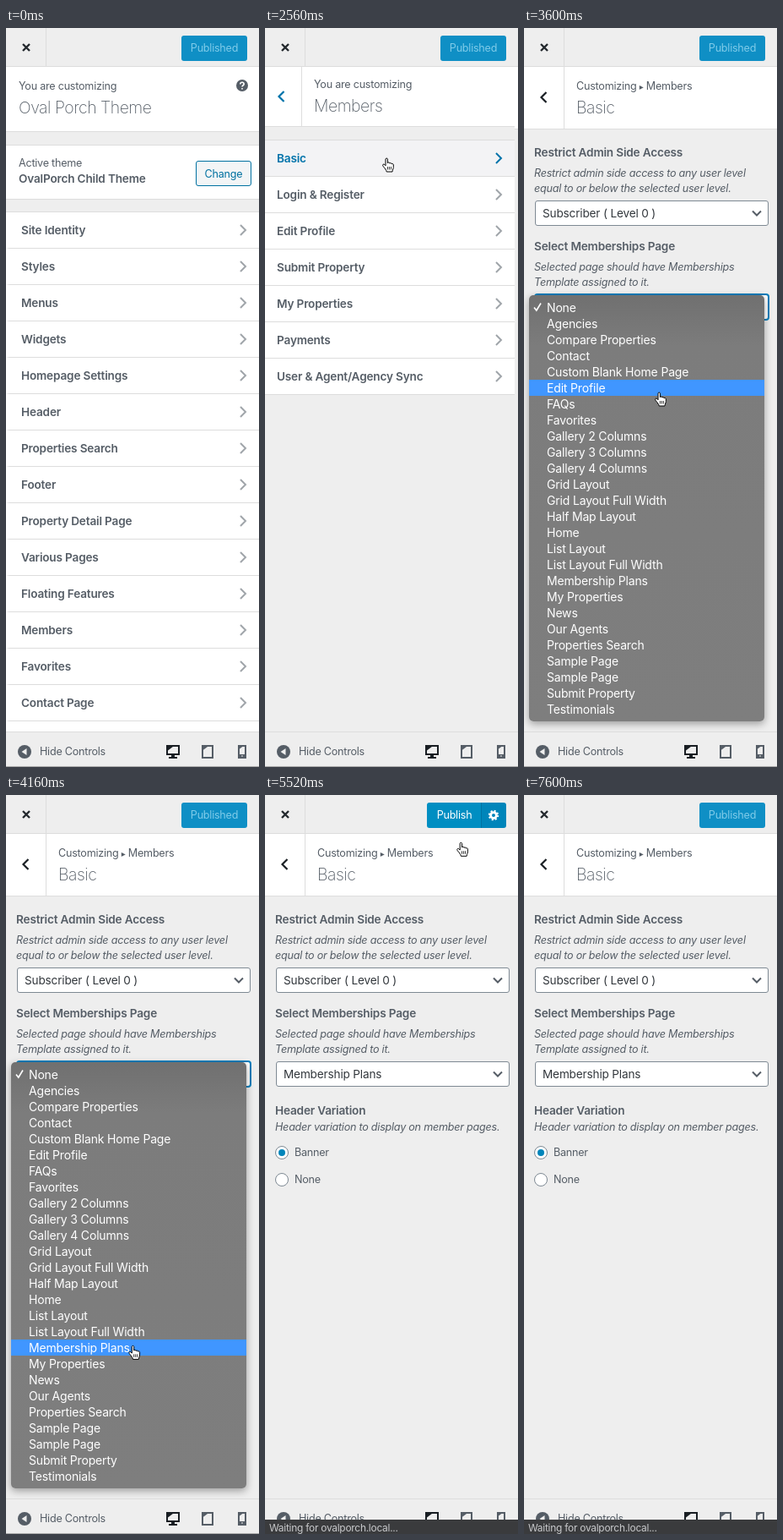
Recreate the animation shown at these times as an HTML page. Size 300 by 874 pixels, loop 8.4 s.

```html
<!DOCTYPE html>
<html lang="en">
<head>
<meta charset="utf-8">
<title>Customizer</title>
<style>
html, body { margin: 0; width: 100%; height: 100%; overflow: hidden; background: #eee; }
#stage { position: relative; width: 300px; height: 874px; overflow: hidden; background: #eee;
  font: 12.6px/20px Inter, "Liberation Sans", sans-serif; letter-spacing: -.019em; color: #555d66;
  -webkit-font-smoothing: antialiased; }
#stage div, #stage svg { position: absolute; box-sizing: border-box; }
svg { overflow: visible; fill: none; }
.t { white-space: pre; height: 20px; }
.b { font-size: 13.6px; font-weight: 600; letter-spacing: -.013em; }
.h { font-size: 19.4px; font-weight: 200; letter-spacing: -.024em; }
.i { font-style: italic; }
.panel { left: 0; top: 0; width: 300px; height: 874px; background: #eee; }
.card { background: #fff; border: 0 solid #ddd; border-bottom-width: 1px; }
.card.both { border-top-width: 1px; }
.list { left: 0; width: 300px; border-top: 1px solid #ddd; }
.row { left: 0; width: 300px; height: 43px; background: #fff; border-left: 4px solid #fff; border-bottom: 1px solid #ddd; }
.row .t { left: 14px; top: 11px; }
.row svg, .back svg { stroke: #a0a5aa; stroke-width: 2; }
.row.on { background: #f3f3f5; border-left-color: #0073aa; color: #0073aa; }
.row.on svg { stroke: #0073aa; }
.back { left: 0; top: 46px; width: 48px; border-right: 1px solid #ddd; border-left: 4px solid #fff; background: #fff; }
.back svg { stroke: #191e23; stroke-width: 2.2; }
.back.on { border-left-color: #0073aa; }
.back.on svg { stroke: #0073aa; }
.select { left: 13px; width: 277px; height: 30px; background: #fff; border: 1px solid #7e8993; border-radius: 3px; }
.select .t { left: 8px; top: 4px; font-size: 13.6px; letter-spacing: -.012em; color: #32373c; }
.select svg { stroke: #555d66; stroke-width: 2; }
.select.on { border-color: #007cba; box-shadow: 0 0 0 1px #007cba; }
.select.on .t { color: #0071a1; }
.radio { left: 12px; width: 16px; height: 16px; border: 1px solid #7e8993; border-radius: 50%; background: #fff; }
.radio.on::after { content: ""; position: absolute; left: 3px; top: 3px; width: 8px; height: 8px; border-radius: 50%; background: #0085ba; }
.change { left: 225px; top: 157px; width: 66px; height: 30px; border: 1px solid #0071a1; border-radius: 3px;
  background: #f3f5f6; color: #0071a1; text-align: center; line-height: 29px; }
.bar { left: 0; width: 300px; background: #eee; border: 0 solid #ddd; }
.btn { top: 9px; height: 30px; line-height: 29px; text-align: center; background: #0f8fc5; color: #7fcbe9; border-radius: 3px; }
.btn.live { background: #0085ba; color: #fff; }
.btn.hover { background: #008ec2; }
.menu, .shade { left: 6px; top: 316px; width: 279px; height: 504px; border-radius: 5px; }
.menu { overflow: hidden; background: linear-gradient(#707070, #7c7c7c 12%, #7e7e7e);
  color: #fff; font-size: 14px; letter-spacing: -.012em; }
.shade { box-shadow: 0 3px 10px rgba(0,0,0,.35); }
.opt { left: 0; width: 279px; height: 19px; line-height: 19px; padding-left: 21px; white-space: pre; }
.opt.on { background: #4096ff; }
.status { left: 0; top: 857px; width: 300px; height: 17px; background: #3a3b3d; color: #c9cacc;
  font-size: 11.9px; line-height: 20px; padding-left: 5px; white-space: pre; }
</style>
</head>
<body>
<div id="stage"></div>
<script>
const LOOP = 8400, STEP = 80;
const rootItems = ["Site Identity", "Styles", "Menus", "Widgets", "Homepage Settings", "Header",
  "Properties Search", "Footer", "Property Detail Page", "Various Pages", "Floating Features",
  "Members", "Favorites", "Contact Page", ""];
const memberItems = ["Basic", "Login &amp; Register", "Edit Profile", "Submit Property",
  "My Properties", "Payments", "User &amp; Agent/Agency Sync"];
const pages = ["None", "Agencies", "Compare Properties", "Contact", "Custom Blank Home Page",
  "Edit Profile", "FAQs", "Favorites", "Gallery 2 Columns", "Gallery 3 Columns", "Gallery 4 Columns",
  "Grid Layout", "Grid Layout Full Width", "Half Map Layout", "Home", "List Layout",
  "List Layout Full Width", "Membership Plans", "My Properties", "News", "Our Agents",
  "Properties Search", "Sample Page", "Sample Page", "Submit Property", "Testimonials"];

// Markup helpers; text is placed by its left edge and vertical centre.
const text = (x, y, s, cls = "") => `<div class="t ${cls}" style="left:${x}px;top:${y - 10}px">${s}</div>`;
const card = (y, h, cls = "") => `<div class="card ${cls}" style="left:0;width:300px;top:${y}px;height:${h}px"></div>`;
const icon = (x, y, body, attrs = "") =>
  `<svg width="1" height="1" style="left:${x}px;top:${y}px" ${attrs}>${body}</svg>`;
const list = (id, y, names) => `<div class="list" id="${id}" style="top:${y}px">` + names.map((s, i) =>
  `<div class="row" style="top:${i * 43}px">${text(14, 21, s, "b")}${icon(277, 21, '<path d="M-3-6L3 0L-3 6"/>')}</div>`
).join("") + "</div>";
const back = (id, h, y) => `<div class="back" id="${id}" style="height:${h}px">${icon(19, y, '<path d="M3.5-6L-2.5 0L3.5 6"/>')}</div>`;
const select = (id, y, s) => `<div class="select" id="${id}" style="top:${y}px">${text(8, 14, s)}${icon(262, 14, '<path d="M-5-2.5L0 2.5L5-2.5"/>')}</div>`;
const radio = (y, s, cls = "") => `<div class="radio ${cls}" style="top:${y - 8}px"></div>` + text(35, y, s);

const rootPanel = `<div class="panel" id="root">
  ${card(46, 77)}${text(15, 69, "You are customizing")}${text(15, 94, "Oval Porch Theme", "h")}
  ${icon(280, 68, '<circle r="7" fill="#555d66"/><path d="M-2.2-1.6C-2.2-4.4 2.4-4.4 2.2-1.6C2.1-.2 0-.2 0 1.6M0 3V4.6" stroke="#fff" stroke-width="1.6"/>')}
  ${card(138, 65, "both")}${text(15, 160, "Active theme")}${text(15, 178, "OvalPorch Child Theme", "b")}
  <div class="change">Change</div>${list("rootList", 217, rootItems)}</div>`;

const memberPanel = `<div class="panel" id="members">
  ${card(46, 71)}${back("memberBack", 70, 35)}${text(62, 67, "You are customizing")}${text(62, 92, "Members", "h")}
  ${list("memberList", 132, memberItems)}</div>`;

const basicPanel = `<div class="panel" id="basic">
  ${card(46, 74)}${back("basicBack", 73, 36)}
  ${text(62, 68.5, 'Customizing <span style="font-size:10px">▸</span> Members')}${text(62, 94, "Basic", "h")}
  ${text(12, 147, "Restrict Admin Side Access", "b")}
  ${text(12, 172, "Restrict admin side access to any user level", "i")}
  ${text(12, 190, "equal to or below the selected user level.", "i")}
  ${select("level", 204, "Subscriber ( Level 0 )")}
  ${text(12, 258, "Select Memberships Page", "b")}
  ${text(12, 283, "Selected page should have Memberships", "i")}
  ${text(12, 301, "Template assigned to it.", "i")}
  ${select("page", 315, "None")}
  ${text(12, 373, "Header Variation", "b")}
  ${text(12, 393, "Header variation to display on member pages.", "i")}
  ${radio(423, "Banner", "on")}${radio(455, "None")}</div>`;

const topBar = `<div class="bar" style="top:0;height:46px;border-bottom-width:1px">
  <div style="left:47px;top:0;width:1px;height:45px;background:#ddd"></div>
  ${icon(24, 23, '<path d="M-4-4L4 4M4-4L-4 4" stroke="#23282d" stroke-width="2.4"/>')}
  <div class="btn" id="done" style="left:208px;width:78px">Published</div>
  <div id="publish"><div class="btn" id="save" style="left:192px;width:65px;border-radius:3px 0 0 3px">Publish</div>
    <div class="btn live" style="left:256px;width:30px;border-radius:0 3px 3px 0;border-left:1px solid #0072a3">
    ${icon(14, 15, '<circle r="3.4" stroke-width="2.8"/><circle r="5.2" stroke-width="2" stroke-dasharray="2.04 2.04"/>', 'stroke="#fff"')}</div></div>
  ${icon(178, 23, '<circle r="9" fill="#8b8e92"/><circle id="dot" cx="5" r="2" fill="#eee"/>', 'id="spin"')}</div>`;

const device = (x, w, h, c) => `<path d="M${x} 849h${w}v${h}h${-w}z" stroke="${c}" stroke-width="2"/>
  <path d="M${x + 1} 850h${w * .42}l${-w * .42} ${w * .32}z" fill="${c}"/>`;
const footer = `<div class="bar" style="top:832px;height:42px;border-top-width:1px">${text(40, 23, "Hide Controls")}
  <div style="left:0;top:40px;width:300px;height:1px;background:#a9a9a9"></div></div>
  ${icon(0, 0, `<circle cx="22" cy="856" r="8" fill="#555d66"/><path d="M24.5 852v8l-6-4z" fill="#eee"/>
  ${device(191, 14, 10, "#191e23")}<path d="M196 860h4v2h3v2h-10v-2h3z" fill="#191e23"/>
  ${device(233, 12, 14, "#555d66")}
  ${device(276, 8, 14, "#555d66")}<path d="M276 859h8v4h-8z" fill="#555d66"/><path d="M279 861h2" stroke="#eee"/>`)}`;

const menu = `<div id="menu"><div class="shade"></div><div class="menu">` + pages.map((s, i) =>
  `<div class="opt" style="top:${4.5 + i * 19}px">${s}</div>`).join("") +
  icon(10, 14, '<path d="M-4 .5L-1.2 4L4-4.5" stroke="#fff" stroke-width="1.6"/>') + "</div></div>";

const pointer = `<svg id="cursor" width="1" height="1" style="left:0;top:0">
  <path id="arrow" d="M0 0V13.6L3.1 10.7L5.2 15.8L7.6 14.8L5.4 9.9H9.6Z" fill="#000" stroke="#fff"/>
  <g id="hand" transform="translate(-4 -.5)" stroke="#000"><path fill="#fff" d="M4 1.6C4 .2 6.4 .2 6.4 1.6V6.2C6.8 5 8.7 5.2 8.8 6.6C9.4 5.8 11 6 11.1 7.3C12 6.6 13.3 7 13.3 8.4V11C13.3 13 12.2 13.8 12 16.5H5.2C5 14.5 3.2 12.8 1 9.8C-.2 8.2 1.6 6.8 2.8 8L4 9.3Z"/>
  <path d="M6.4 10.5V14M8.4 10.5V14M10.4 10.5V14" stroke-width=".8"/></g></svg>`;

const stage = document.getElementById("stage");
stage.innerHTML = rootPanel + memberPanel + basicPanel + topBar + footer +
  '<div class="status" id="status">Waiting for ovalporch.local...</div>' + menu + pointer;

const $ = id => document.getElementById(id);
const show = (id, on) => { $(id).style.display = on ? "" : "none"; };
const mark = (el, on) => el.classList.toggle("on", on);
const markRow = (rows, n) => [...rows].forEach((el, i) => mark(el, i === n));
const within = (t, a, b) => t >= a && t < b;
const clamp = v => Math.min(1, Math.max(0, v));
const inOutCubic = v => v < .5 ? 4 * v ** 3 : 1 - 4 * (1 - v) ** 3;
const slide = (t, start) => inOutCubic(clamp((t - start) / 180));
const smooth = v => v * v * (3 - 2 * v);
const linear = v => v;
const easeOut = v => 1 - (1 - v) ** 1.7;

// Pointer stops: time, x, y, easing towards the stop.
const stops = [
  [0, 312, 80], [400, 135, 113], [480, 135, 113], [1120, 117, 711], [1360, 117, 711],
  [2080, 143, 154], [2640, 143, 154], [3360, 158, 331], [3440, 158, 331],
  [3600, 159, 431, linear], [4240, 149, 658, easeOut], [5040, 149, 658], [5600, 236, 21],
  [5760, 236, 21], [6480, 112.5, 618], [7440, 112.5, 618], [7520, 208, 430]
];
function pointerAt(t) {
  const n = stops.findIndex(s => s[0] >= t);
  if (n < 1) return stops[n < 0 ? stops.length - 1 : 0].slice(1, 3);
  const [t0, x0, y0] = stops[n - 1], [t1, x1, y1, ease = smooth] = stops[n];
  const k = ease((t - t0) / (t1 - t0));
  return [x0 + (x1 - x0) * k, y0 + (y1 - y0) * k];
}
const handTimes = [[720, 1280], [2000, 2800], [3120, 5120], [5520, 5920]];

function draw(t) {
  const [x, y] = pointerAt(t);
  const first = slide(t, 1226), second = slide(t, 2533);
  const move = (id, dx) => { $(id).style.transform = `translateX(${Math.round(dx)}px)`; };
  move("root", -300 * first);
  move("members", 300 * (1 - first) - 300 * second);
  move("basic", 300 * (1 - second));

  markRow($("rootList").children, Math.floor((y - 218) / 43));
  markRow($("memberList").children, first === 1 ? Math.floor((y - 133) / 43) : -1);
  mark($("memberBack"), first === 1);
  mark($("basicBack"), within(t, 2720, 3280));

  const chosen = t >= 4720;
  mark($("page"), within(t, 3280, 4960));
  $("page").firstChild.textContent = chosen ? "Membership Plans" : "None";
  show("menu", within(t, 3280, 4640));
  markRow(document.querySelectorAll(".opt"), t < 4560 ? Math.floor((y - 320.5) / 19) : -1);

  const saving = within(t, 5840, 7200), open = within(t, 4720, 7200);
  show("done", !open);
  show("publish", open);
  $("save").classList.toggle("live", !saving);
  $("save").classList.toggle("hover", within(t, 5520, 5840));
  show("spin", saving);
  $("dot").setAttribute("transform", `rotate(${(t - 6560) * .36 - 45})`);
  show("status", chosen);

  const hand = handTimes.some(([a, b]) => within(t, a, b));
  show("cursor", within(t, 80, 7600));
  show("arrow", !hand);
  show("hand", hand);
  $("cursor").style.transform = `translate(${x}px,${y}px)`;
}

const start = performance.now();
function tick() {
  const t = (performance.now() - start) % LOOP;
  draw(Math.floor(t / STEP) * STEP);
  requestAnimationFrame(tick);
}
tick();
</script>
</body>
</html>
```
